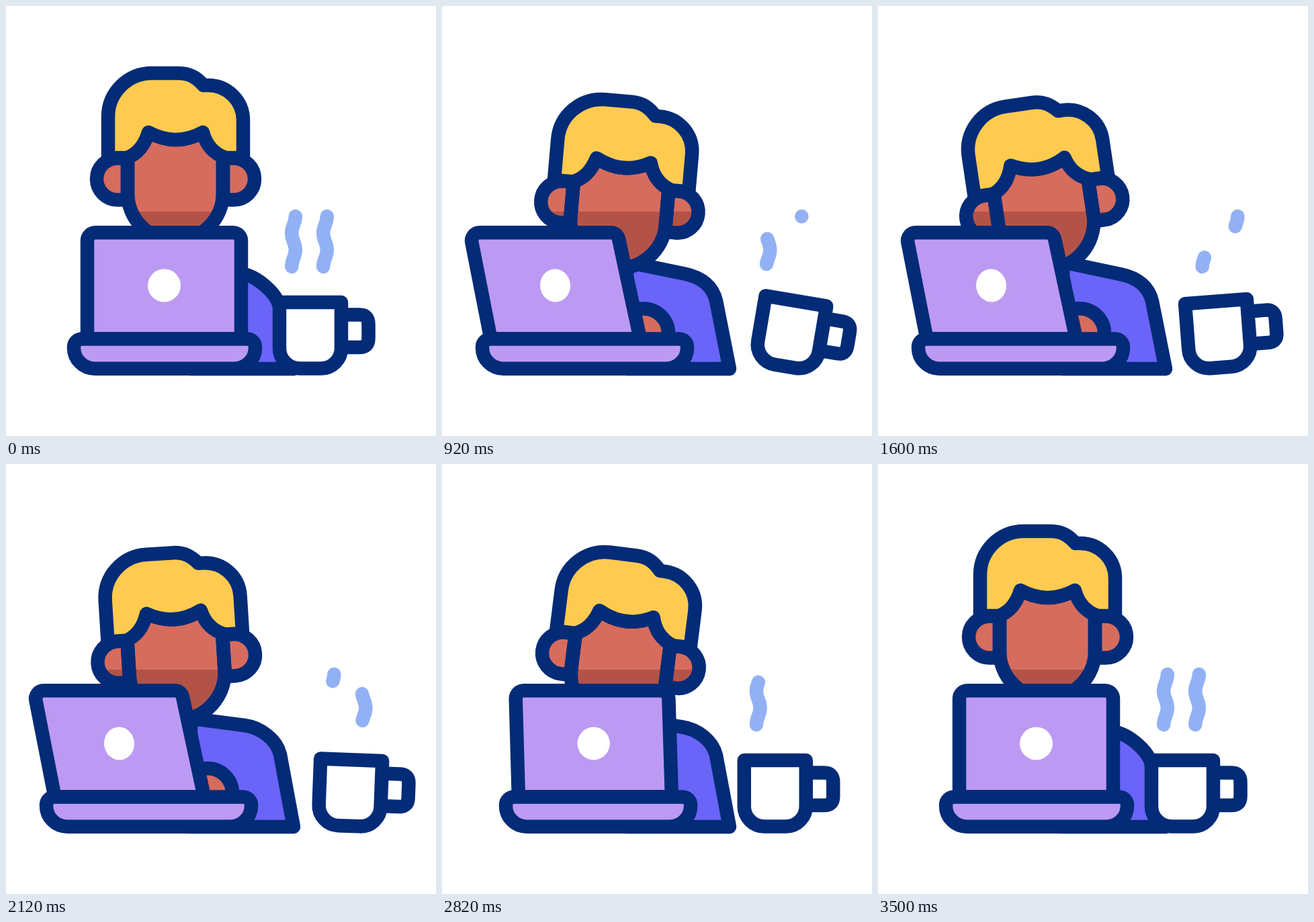
These frames come from a looping animation (640 px wide and 640 px high, 3600 ms). An HTML page with a canvas:

```html
<!DOCTYPE html>
<html lang="en">
<head>
<meta charset="utf-8">
<title>Working at a laptop</title>
<style>
  html, body { margin: 0; width: 100%; height: 100%; overflow: hidden; background: #fff; }
  canvas { display: block; }
</style>
</head>
<body>
<canvas id="stage" width="640" height="640"></canvas>
<script>
const LOOP = 3600;
const NAVY = '#032b77', HAIR = '#fecb50', SKIN = '#d66c5d', SHADE = '#b35348',
      LILAC = '#bc9af3', SHIRT = '#6a64f8', STEAM = '#92b1f5', WHITE = '#fff';
const ctx = document.getElementById('stage').getContext('2d');

const lerp = (a, b, u) => a + (b - a) * u;
const clamp = (v, low, high) => Math.min(high, Math.max(low, v));
const ease = u => (1 - Math.cos(Math.PI * clamp(u, 0, 1))) / 2;

// Eases 0 to 1 from the loop start, then back to 0 from `back`
const outAndBack = (t, rise, back, fall) => ease(t / rise) - ease((t - back) / fall);

// The head sways left and right between these turning points
const swayTurns = [[0, 0], [500, -6], [1080, 7.3], [1720, -9.9], [2700, 7.8], [3334, 0]];
const sway = t => swayTurns.slice(1).reduce((angle, [time, next], i) => {
  const [from, before] = swayTurns[i];
  return angle + (next - before) * ease((t - from) / (time - from));
}, 0);

// The cup tips over to one side, then rocks to rest in shrinking swings
function rock(t) {
  const swings = (Math.min(t, 2425) - 1000) / 570;
  return 10.3 * (swings < 0
    ? ease((t - 540) / 460)
    : 0.45 ** swings * Math.cos(Math.PI * swings));
}

function poseAt(t) {
  const lean = outAndBack(t, 740, 2600, 734);
  const bob = Math.sin(Math.PI * (clamp(t, 810, 2560) - 810) / 875) ** 2;
  const drop = 43 * lean - 11 * bob;
  return {
    drop,
    headX: 5.7 * lean,
    headTilt: sway(t),
    raise: clamp(drop / 17, 0, 1),
    sink: clamp((drop - 32) / 11, 0, 1),
    lid: outAndBack(t, 545, 2400, 560),
    cupX: 57.5 * outAndBack(t, 540, 2590, 680),
    cupTilt: rock(t)
  };
}

const hair = new Path2D('M152 226V165A65 65 0 0 1 217 100H257C274 100 284 107 294 118H301' +
  'A52 52 0 0 1 353 170V226H327C310 220 298 208 293 188Q253 210 212 188C206 208 196 220 180 226Z');
const face = new Path2D('M181 226V278A71 71 0 0 0 323 278V226L293 188Q253 210 212 188Z');
const ears = new Path2D('M181 226.5H166A31 31 0 0 0 166 288.5H181ZM323 226.5H339A31 31 0 0 1 339 288.5H323Z');
const skin = new Path2D();
skin.addPath(ears);
skin.addPath(face);
const hand = new Path2D('M263 487A37 37 0 0 1 337 487V500H263Z');
const mug = new Path2D('M407 441H499V509A30 30 0 0 1 469 539.5H437A30 30 0 0 1 407 509Z');
const handle = new Path2D('M499 459.5H526Q539.5 459.5 539.5 473V495Q539.5 508 526 508H499');

function paint(path, fill) {
  if (fill) {
    ctx.fillStyle = fill;
    ctx.fill(path);
  }
  ctx.strokeStyle = NAVY;
  ctx.stroke(path);
}

// Draws with the origin of the art at (x, y) moved by (dx, dy) and turned about it
function turned(x, y, dx, dy, degrees, drawPart) {
  ctx.save();
  ctx.translate(x + dx, y + dy);
  ctx.rotate(degrees * Math.PI / 180);
  ctx.translate(-x, -y);
  drawPart();
  ctx.restore();
}

function drawBody({ raise, sink }) {
  const x = 345 + 10 * raise + 8 * sink;
  const y = 398 - 9 * raise + 11.5 * sink;
  const slope = 0.13 * raise + 0.09 * sink;
  const endX = 407 + raise;
  const endY = 447 - 15 * raise + 8 * sink;
  const body = new Path2D();
  body.moveTo(275, 540);
  body.lineTo(275, y - slope * (x - 275));
  body.lineTo(x, y);
  body.bezierCurveTo(x + 25, y + 25 * slope, endX - 5, endY - 21, endX, endY);
  body.lineTo(428, 540);
  body.closePath();
  paint(body, SHIRT);
}

function drawHead() {
  ctx.fillStyle = SKIN;
  ctx.fill(skin);
  // The shadow keeps its height on the stage while the head moves
  ctx.save();
  ctx.clip(skin);
  ctx.setTransform(1, 0, 0, 1, 0, 0);
  ctx.fillStyle = SHADE;
  ctx.fillRect(0, 306, 640, 334);
  ctx.restore();
  paint(ears);
  paint(face);
  paint(hair, HAIR);
}

function drawLaptop({ lid }) {
  const topL = lerp(121, 41.5, lid), topR = lerp(350, 261, lid);
  const lowL = lerp(121, 72.6, lid), lowR = lerp(350, 295, lid);
  const screen = new Path2D();
  screen.moveTo(lowL, 495.5);
  screen.arcTo(topL, 337.3, topR, 337.3, 12);
  screen.arcTo(topR, 337.3, lowR, 495.5, 12);
  screen.lineTo(lowR, 495.5);
  screen.closePath();
  paint(screen, LILAC);

  ctx.fillStyle = WHITE;
  ctx.beginPath();
  ctx.ellipse(lerp(235.5, 168.5, lid), 416, 24.5 - 2 * lid, 24.5, -0.1 * lid, 0, 7);
  ctx.fill();

  const left = lerp(101, 60, lid), right = lerp(371, 365, lid);
  const base = new Path2D();
  base.roundRect(left, 495.5, right - left, 44.2, [12, 12, 31, 31]);
  paint(base, LILAC);
}

// Draws the wavy line from s = from (top is 0) down to s = to (bottom is 1)
function drawWave(x, from, to) {
  if (to - from < 0.0005) return;
  ctx.beginPath();
  for (let k = 0; k <= 30; k++) {
    const s = lerp(from, to, k / 30);
    ctx.lineTo(x + 2.8 * Math.cos(3 * Math.PI * s), 313 + 75 * s);
  }
  ctx.stroke();
}

// Puffs rise at a steady pace; the last one enters late and stays
function drawSteam(t, x, firstLeave, lastEnter) {
  const travel = 600, gap = 832;
  const height = start => 1 - ease((t - start) / travel);
  ctx.strokeStyle = STEAM;
  for (let k = 0; k < 3; k++) {
    const leave = firstLeave + gap * k;
    drawWave(x, k ? height(leave - gap + travel) : 0, height(leave));
  }
  drawWave(x, height(lastEnter), 1);
}

function drawCup() {
  paint(handle);
  paint(mug, WHITE);
}

function draw(now) {
  const t = now % LOOP;
  const pose = poseAt(t);
  const lift = 20 * Math.abs(Math.sin(pose.cupTilt * Math.PI / 180));
  ctx.fillStyle = WHITE;
  ctx.fillRect(0, 0, 640, 640);
  ctx.lineWidth = 20.5;
  ctx.lineCap = ctx.lineJoin = 'round';
  drawBody(pose);
  turned(252.5, 329, pose.headX, pose.drop, pose.headTilt, drawHead);
  turned(300, 487, 0, 3 * (1 - pose.sink), 0, () => paint(hand, SKIN));
  drawLaptop(pose);
  drawSteam(t, 428 + pose.cupX, 0, 2376);
  drawSteam(t, 475 + pose.cupX, 345, 2840);
  turned(453, 540, pose.cupX, -lift, pose.cupTilt, drawCup);
}

let start;
function tick(now) {
  start ??= now;
  draw(Math.max(0, now - start));
  requestAnimationFrame(tick);
}
draw(0);
requestAnimationFrame(tick);
</script>
</body>
</html>
```
